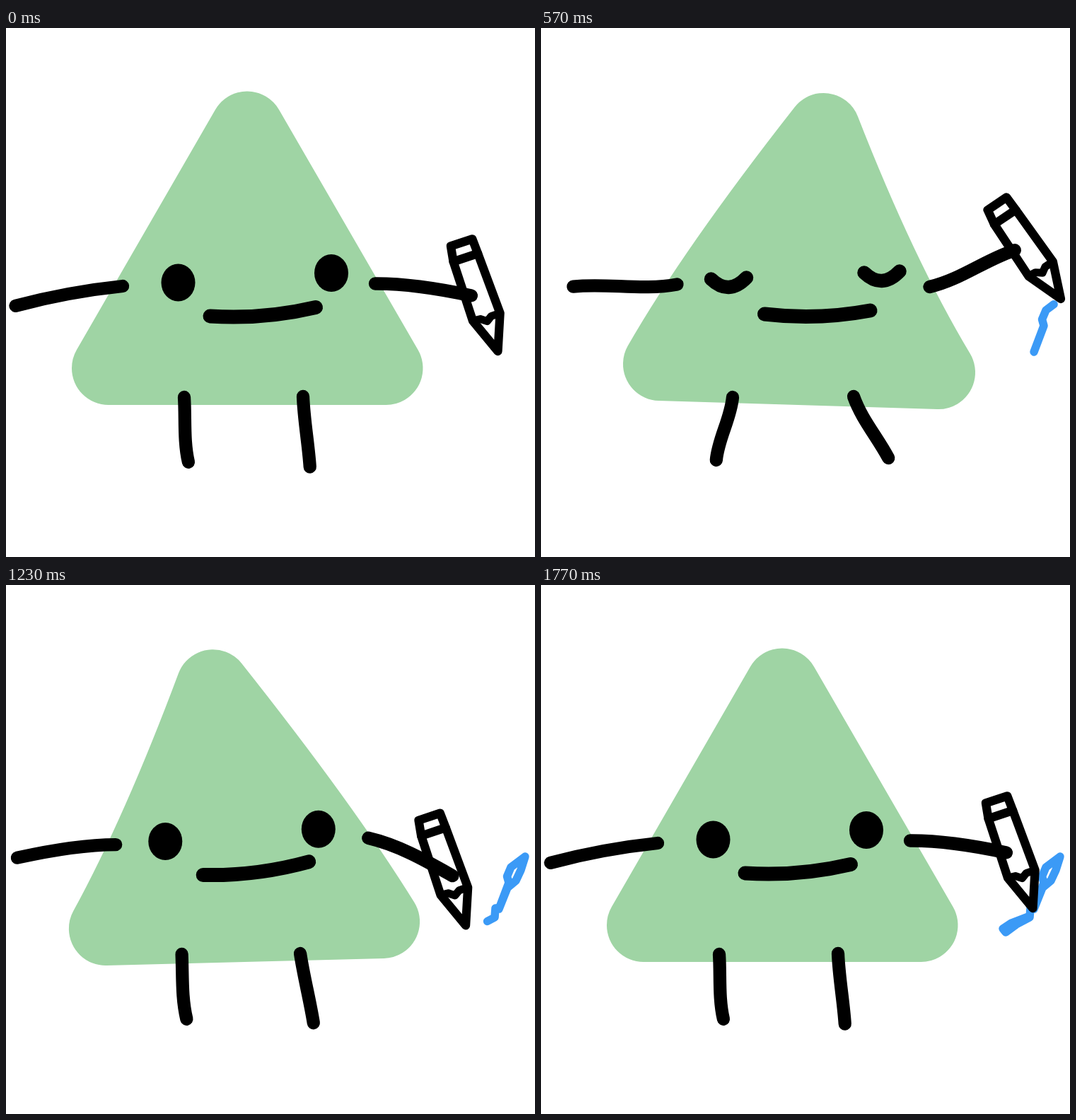
Animation, 748 px wide and 748 px high, one loop 1800 ms. Source, as an HTML page with a canvas:

```html
<!DOCTYPE html>
<html lang="en">
<head>
<meta charset="utf-8">
<title>Drawing triangle</title>
<style>
html, body { margin: 0; width: 100%; height: 100%; overflow: hidden; background: #fff; }
canvas { display: block; width: 748px; height: 748px; }
</style>
</head>
<body>
<canvas id="stage" width="748" height="748"></canvas>
<script>
const ctx = document.getElementById("stage").getContext("2d");
const SIZE = 748, LOOP = 1800, STEP = 30;
const GREEN = "#9fd4a4", BLUE = "#3b9af6", BLACK = "#000";
const RIGHT = 570, LEFT = 1170, REST = 1770;
const CORNER = 52;

const rad = deg => deg * Math.PI / 180;
const mix = (a, b, k) => a + (b - a) * k;
const mixPoint = (a, b, k) => [mix(a[0], b[0], k), mix(a[1], b[1], k)];

function span(t, from, to) {
  return Math.min(1, Math.max(0, (t - from) / (to - from)));
}

// Swings from rest to the right pose, to the left pose and back
function swing(t, rest, right, left) {
  if (t < RIGHT) return mix(rest, right, span(t, 0, RIGHT));
  if (t < LEFT) return mix(right, left, span(t, RIGHT, LEFT));
  return mix(left, rest, span(t, LEFT, REST));
}

function stroke(width, color = BLACK) {
  ctx.lineWidth = width;
  ctx.strokeStyle = color;
  ctx.stroke();
}

function polyline(points) {
  ctx.beginPath();
  points.forEach(([x, y]) => ctx.lineTo(x, y));
}

function drawBody(sway, lean) {
  const top = [341 + 58.5 * sway, 141.5 + 2.5 * sway * sway];
  const right = [537.5 + 24.5 * lean, 481 + 6 * sway];
  const left = [145 + 23 * lean, 481 - 6 * sway];
  const bow = -17 * sway;
  const bend = (a, b, k, dx) => {
    const [x, y] = mixPoint(a, b, k);
    return [x + dx, y];
  };
  const edges = [
    [top, bend(top, right, 0.6, bow), right],
    [right, bend(right, left, 0.5, 0), left],
    [left, bend(left, top, 0.4, bow), top]
  ];
  const normal = (a, b) => Math.atan2(a[0] - b[0], b[1] - a[1]);
  const push = ([x, y], a) => [x + CORNER * Math.cos(a), y + CORNER * Math.sin(a)];

  ctx.beginPath();
  edges.forEach(([a, m, b], i) => {
    const next = edges[(i + 1) % 3];
    ctx.lineTo(...push(a, normal(a, m)));
    ctx.quadraticCurveTo(...push(m, normal(a, b)), ...push(b, normal(m, b)));
    ctx.arc(...b, CORNER, normal(m, b), normal(b, next[1]));
  });
  ctx.fillStyle = GREEN;
  ctx.fill();
}

function drawEye(x, y, closed) {
  ctx.beginPath();
  if (closed) {
    ctx.moveTo(x - 25, y - 2);
    ctx.quadraticCurveTo(x, y + 22, x + 25, y - 4);
    stroke(19.5);
  } else {
    ctx.ellipse(x, y, 24, 26.5, 0, 0, 2 * Math.PI);
    ctx.fillStyle = BLACK;
    ctx.fill();
  }
}

function drawFace(t, sway, ride) {
  const closed = t >= 510 && t < 660;
  const x = 243.5 + 22 * sway;
  drawEye(x, 360 - 3 * sway, closed);
  drawEye(x + 216.5, 346.5 + 1.5 * sway, closed);

  const left = 288.5 + ride, y = 407.5 - 3 * sway;
  ctx.beginPath();
  ctx.moveTo(left, y);
  ctx.quadraticCurveTo(left + 75, y + 5 + 4 * sway, left + 149.5, 395 + 4.5 * sway);
  stroke(20);
}

// A limb leaves its joint at an angle, bent sideways near each end
function drawLimb(x, y, angle, length, near, far) {
  ctx.save();
  ctx.translate(x, y);
  ctx.rotate(rad(angle));
  ctx.beginPath();
  ctx.moveTo(0, 0);
  ctx.bezierCurveTo(length / 3, near, length * 2 / 3, far, length, 0);
  stroke(18.3);
  ctx.restore();
}

function drawLimbs(t, sway, lean, ride) {
  drawLimb(165 + ride, 365 - 2.5 * sway, swing(t, 169.6, 178.8, 172.7),
    swing(t, 154, 147, 139), 4 - 12 * lean, 4);
  drawLimb(522 + ride, 361.5 + 4.5 * sway, swing(t, 7.1, -23.3, 26),
    swing(t, 137, 131, 130), -6 + 14 * lean, -4);
  drawLimb(252 + 19 * lean, 522, swing(t, 86.3, 104.6, 85.7), 92, -5 * lean, 5);
  drawLimb(420 + 22 * lean, 521, swing(t, 84.4, 60.5, 78.6), 100, 2 + 4 * lean, -1);
}

// The scribble grows along its path at a steady speed
function drawInk(t) {
  const drawn = 0.19 * (t - 165);
  if (drawn <= 0) return;
  polyline([
    [697, 458], [711, 421], [708.5, 412], [714, 399], [734, 384],
    [728, 403], [721, 418], [709, 428], [697, 458],
    [692, 457], [691, 470], [672, 480], [657, 491], [653, 486], [665, 478], [691, 468]
  ]);
  ctx.setLineDash([drawn, SIZE]);
  stroke(11.5, BLUE);
  ctx.setLineDash([]);
}

function pencilTip(t) {
  if (t < RIGHT) return mixPoint([695.5, 457], [714.5, 395], span(t, 0, RIGHT));
  if (t < LEFT) {
    const k = span(t, RIGHT, LEFT);
    return mixPoint([735, 383], [676.5, 480], k * (1 + k) / 2);
  }
  return mixPoint([645, 484], [695.5, 457], span(t, LEFT, REST));
}

function drawPencil(t) {
  const tilted = t >= RIGHT && t < LEFT;
  ctx.save();
  ctx.translate(...pencilTip(t));
  ctx.rotate(rad(tilted ? -33.8 : -18.5));
  polyline([[0, 0], [-20, -52], [-19.5, -140], [-16, -162], [16, -162], [17, -140], [20, -50]]);
  ctx.closePath();
  stroke(12.3);
  polyline([[-19.5, -140], [17, -140]]);
  stroke(12.3);
  polyline([[-20, -52], [-9, -51], [-1, -45], [7, -50], [20, -50]]);
  stroke(11);
  ctx.restore();
}

function draw(t) {
  const sway = swing(t, 0, 1, -0.92);
  const lean = swing(t, 0, 1, -0.2);
  const ride = 7.5 * sway + 20 * lean;
  ctx.fillStyle = "#fff";
  ctx.fillRect(0, 0, SIZE, SIZE);
  ctx.lineCap = ctx.lineJoin = "round";
  drawBody(sway, lean);
  drawFace(t, sway, ride);
  drawInk(t);
  drawLimbs(t, sway, lean, ride);
  drawPencil(t);
}

function tick() {
  draw(Math.floor((performance.now() % LOOP) / STEP) * STEP);
  requestAnimationFrame(tick);
}
tick();
</script>
</body>
</html>
```
